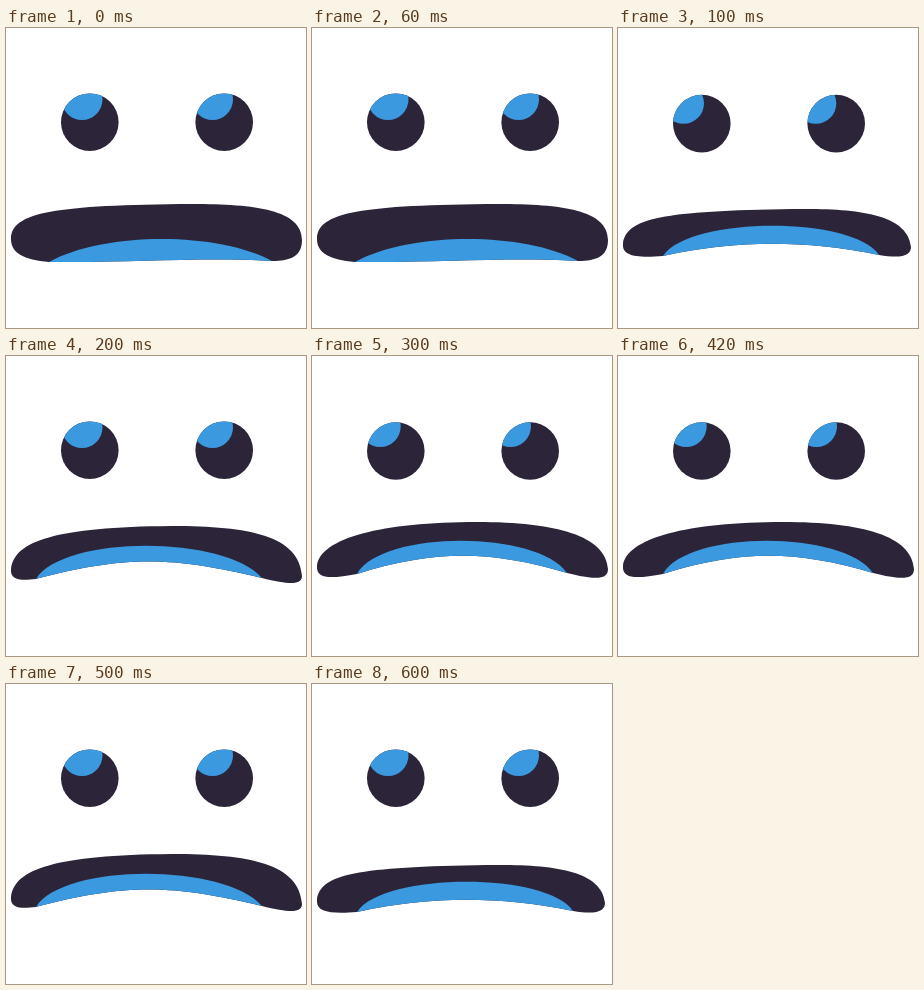
Write an HTML page that moves like this. It is 300 px wide and 300 px high and loops after 700 ms.

```html
<!DOCTYPE html>
<html lang="en">
<head>
<meta charset="utf-8">
<title>Worried face</title>
<style>
html, body { margin: 0; height: 100%; overflow: hidden; background: #fff; }
svg { display: block; width: 100%; height: 100%; }
.dark { fill: #2c2439; }
.blue { fill: #3b99e0; }
</style>
</head>
<body>
<svg viewBox="0 0 300 300">
  <clipPath id="left"><circle class="ball" cx="83.8" r="28.8"/></clipPath>
  <clipPath id="right"><circle class="ball" cx="218.2" r="28.8"/></clipPath>
  <circle class="dark ball" cx="83.8" r="28.8"/>
  <circle class="dark ball" cx="218.2" r="28.8"/>
  <g clip-path="url(#left)"><circle class="blue shine" r="20.5"/></g>
  <g clip-path="url(#right)"><circle class="blue shine" r="20.5"/></g>
  <path class="dark" id="mouth"/>
  <path class="blue" id="tongue"/>
</svg>
<script>
// a, b: tongue corners; rim: outer edge from a round to b; lip and arch: curve handles
const mouths = [
  { a: '43 234', b: '266 233', lip: '190 229 130 235', arch: '98 203.5 212 203.5',
    rim: 'C18 232 5 225 5 211C5 184 50 177 186 176C250 176 296 182 296 212C296 228 285 233' },
  { a: '45 228', b: '261 227', lip: '185 212 120 212', arch: '72 188 235 188',
    rim: 'C18 230 4 228 5 216C8 190 45 183 175 181C240 180 290 186 293 219C293 227 285 231' },
  { a: '30 223', b: '256 222', lip: '170 202 125 198', arch: '58 179 218 179',
    rim: 'C14 225 4 224 5 213C8 185 50 171 165 170C245 170 293 180 296 220C296 229 284 229' },
  { a: '45 218', b: '255 217', lip: '180 195 125 193', arch: '70 174 225 174',
    rim: 'C18 223 4 223 5 210C8 182 70 166 165 166C245 166 294 180 296 213C296 224 283 224' }
];
const up = { y: 94.2, shine: [76, 206.5, 71.5] };
const aside = { y: 95.6, shine: [65.5, 197.8, 75.3] };
const between = { y: 95, shine: [68.2, 198.5, 70.5] };

// one step per 100 ms
const mouthSteps = [0, 1, 2, 3, 3, 2, 1];
const eyeSteps = [up, aside, up, between, between, up, up];

const balls = document.querySelectorAll('.ball');
const shines = document.querySelectorAll('.shine');
const mouth = document.getElementById('mouth');
const tongue = document.getElementById('tongue');
const start = performance.now();

function draw(now) {
  const step = Math.floor(Math.max(0, now - start) / 100) % 7;
  const { a, b, rim, lip, arch } = mouths[mouthSteps[step]];
  const eye = eyeSteps[step];
  const lower = ` ${b}C${lip} ${a}Z`;
  mouth.setAttribute('d', `M${a}${rim}${lower}`);
  tongue.setAttribute('d', `M${a}C${arch}${lower}`);
  balls.forEach(ball => ball.setAttribute('cy', eye.y));
  shines.forEach((shine, i) => {
    shine.setAttribute('cx', eye.shine[i]);
    shine.setAttribute('cy', eye.shine[2]);
  });
  requestAnimationFrame(draw);
}
draw(start);
</script>
</body>
</html>
```
